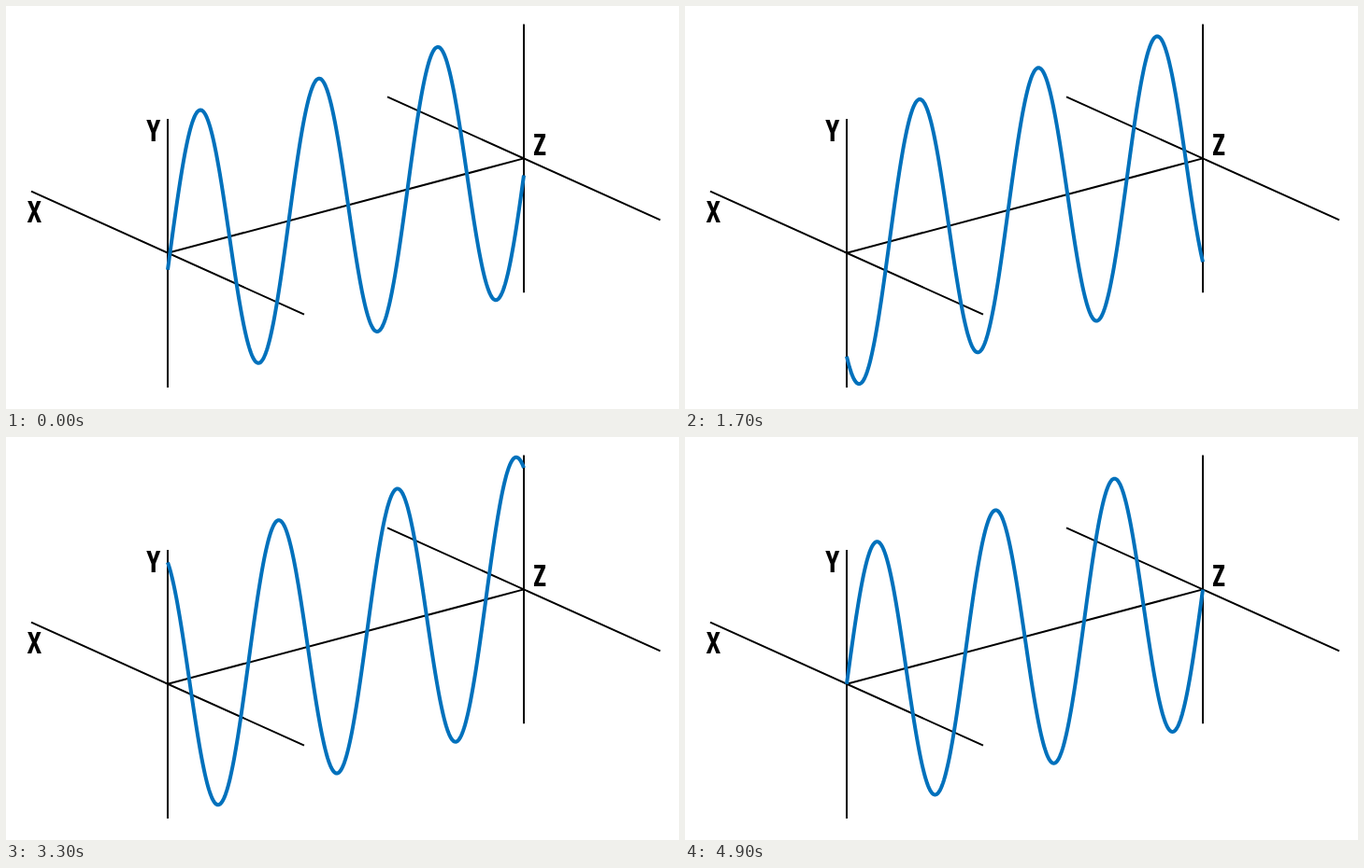
An HTML page for the animation above (5 s loop, 720 by 432 pixels).

```html
<!DOCTYPE html>
<html lang="en">
<head>
<meta charset="utf-8">
<title>Travelling wave</title>
<style>
  html, body { margin: 0; width: 100%; height: 100%; overflow: hidden; background: #fff; }
  svg { display: block; width: 100%; height: 100%; }
  .axis { stroke: #000; stroke-width: 2; fill: none; }
  .wave { stroke: #0071bc; stroke-width: 4; fill: none; stroke-linejoin: round; }
  text {
    font: 500 32px "Noto Sans ExtraCondensed", "Open Sans Condensed", "Open Sans", "Noto Sans", sans-serif;
    font-stretch: 62.5%;
    text-anchor: middle;
  }
  .light { font-weight: 400; }
</style>
</head>
<body>
<svg viewBox="0 0 720 432">
  <path class="axis" d="M173 121V409M27 198.7L319 330.6M554 19.5V307.3M408 97.4L700 229.4M173 264.7L554 163.4"/>
  <path class="wave" id="wave"/>
  <text x="30.3" y="231.5">X</text>
  <text x="157.7" y="144.5">Y</text>
  <text class="light" x="571" y="159.5">Z</text>
</svg>
<script>
  const LOOP = 5000, STEP = 100, STEPS = LOOP / STEP;
  const START = { x: 173, y: 264.7 }, END = { x: 554, y: 163.4 };
  const AMPLITUDE = 144, PERIODS = 3, SAMPLES = 381;
  const wave = document.getElementById('wave');
  let shown = -1;

  // One period passes per loop, in discrete steps.
  function wavePath(step) {
    const shift = (step + 1) / STEPS;
    const points = [];
    for (let i = 0; i <= SAMPLES; i++) {
      const u = i / SAMPLES;
      const x = START.x + (END.x - START.x) * u;
      const base = START.y + (END.y - START.y) * u;
      const y = base - AMPLITUDE * Math.sin(2 * Math.PI * (PERIODS * u - shift));
      points.push(x.toFixed(2) + ' ' + y.toFixed(2));
    }
    return 'M' + points.join('L');
  }

  function draw(ms) {
    const step = Math.floor((ms % LOOP) / STEP);
    if (step === shown) return;
    shown = step;
    wave.setAttribute('d', wavePath(step));
  }

  const begin = performance.now();
  function tick() {
    draw(performance.now() - begin);
    requestAnimationFrame(tick);
  }
  tick();
</script>
</body>
</html>
```
